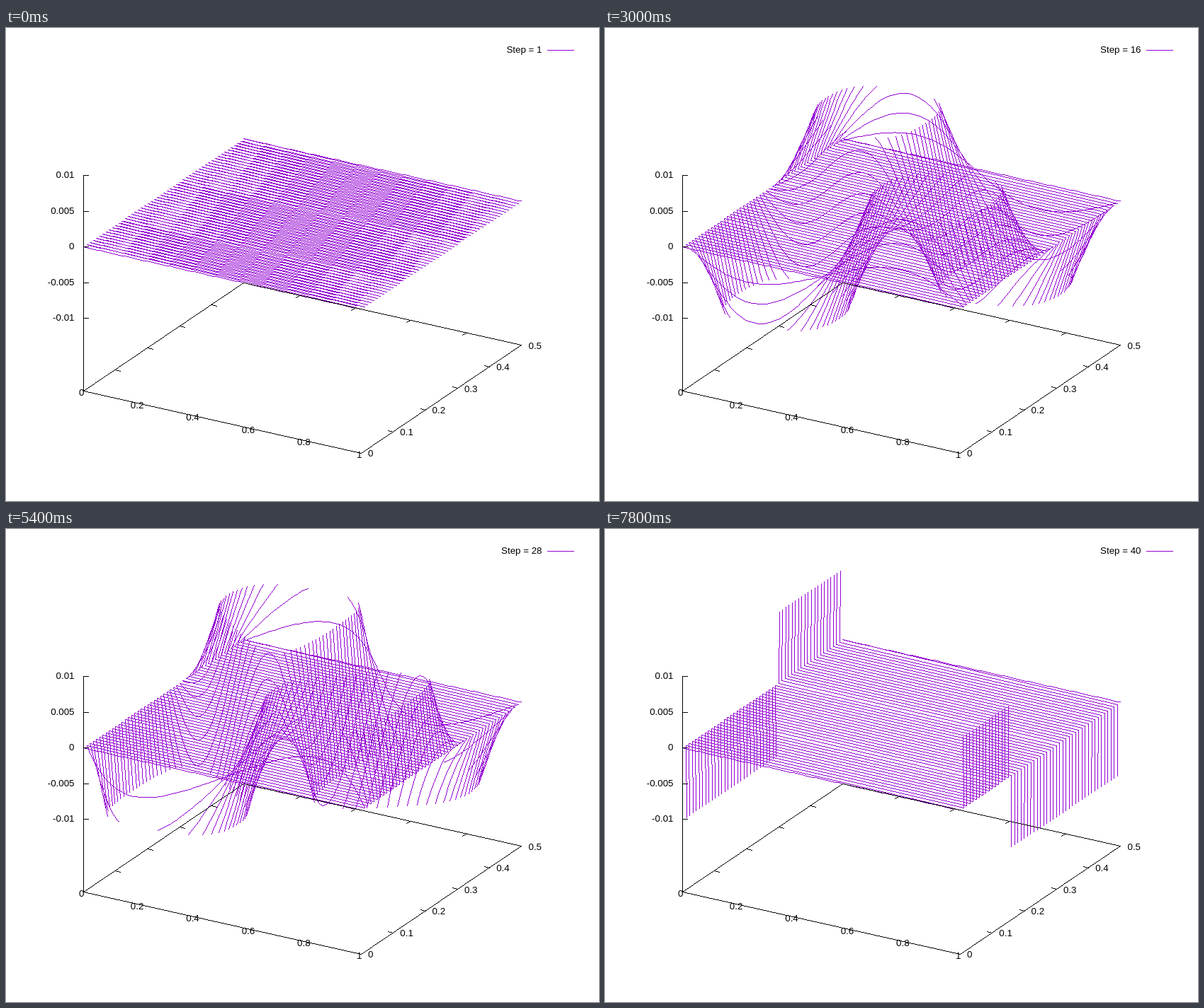
These frames come from a looping animation (837x669 px, 8000 ms). An HTML page with a canvas:

```html
<!DOCTYPE html>
<html lang="en">
<head>
<meta charset="utf-8">
<title>Surface steps</title>
<style>
  html, body { margin: 0; width: 100%; height: 100%; overflow: hidden; background: #fff; }
  canvas, svg { position: absolute; left: 0; top: 0; display: block; }
  text { font: 13.33px "Liberation Sans", Arial, sans-serif; fill: #000; }
  .mid { text-anchor: middle; }
  .end { text-anchor: end; }
</style>
</head>
<body>
<canvas id="plot" width="837" height="669"></canvas>
<svg id="labels" width="837" height="669"><text id="step" class="end" x="756.5" y="35"></text></svg>
<script>
const W = 837, H = 669, COLS = 100, ROWS = 50, STEPS = 40, STEP_MS = 200;
const Z_MAX = 0.01, FLOOR = -0.02015, TAU = 2 * Math.PI;
const BLACK = 0xff000000, VIOLET = 0xffd30094;

const ctx = document.getElementById('plot').getContext('2d');
const image = ctx.createImageData(W, H);
const pixels = new Uint32Array(image.data.buffer);
const svg = document.getElementById('labels');
const stepLabel = document.getElementById('step');

const project = (x, y, z) => [109 + 392 * x + 452.5 * y, 309.2 + 88 * x - 305.5 * y - 10120 * z];
const clamp = (v, lo, hi) => Math.min(hi, Math.max(lo, v));

// One pixel wide line without smoothing
function line([ax, ay], [bx, by], color) {
  let x = Math.round(ax), y = Math.round(ay);
  const ex = Math.round(bx), ey = Math.round(by);
  const dx = Math.abs(ex - x), dy = -Math.abs(ey - y);
  const sx = x < ex ? 1 : -1, sy = y < ey ? 1 : -1;
  let err = dx + dy;
  for (;;) {
    if (x >= 0 && x < W && y >= 0 && y < H) pixels[y * W + x] = color;
    if (x === ex && y === ey) return;
    const twice = 2 * err;
    if (twice >= dy) { err += dy; x += sx; }
    if (twice <= dx) { err += dx; y += sy; }
  }
}

// Line in space, cut off at the ends of the z range
function segment(a, b) {
  const dz = b[2] - a[2];
  if (Number.isNaN(dz)) return;
  let from = 0, to = 1;
  if (dz === 0) {
    if (Math.abs(a[2]) > Z_MAX) return;
  } else {
    const t1 = (-Z_MAX - a[2]) / dz, t2 = (Z_MAX - a[2]) / dz;
    from = Math.max(0, Math.min(t1, t2));
    to = Math.min(1, Math.max(t1, t2));
    if (from >= to) return;
  }
  const at = t => project(...a.map((v, k) => v + (b[k] - v) * t));
  line(at(from), at(to), VIOLET);
}

// Heights of a cellular wave whose points drift until they pile up
function buildFields() {
  const count = (COLS + 1) * (ROWS + 1);
  const startX = new Float64Array(count), startY = new Float64Array(count);
  const fields = [];
  for (let j = 0, k = 0; j <= ROWS; j++)
    for (let i = 0; i <= COLS; i++, k++) { startX[k] = i / COLS; startY[k] = j / ROWS / 2; }

  for (let n = 0; n < STEPS - 1; n++) {
    const squeeze = Math.min(0.98, (n / 37.2) ** 2), lift = 0.73 * squeeze;
    const gain = 0.00176 * n * (1 - 0.5 * squeeze ** 2 + squeeze ** 4);
    const field = new Float64Array(count);
    for (let j = 1; j < ROWS; j++) {
      for (let i = 1; i < COLS; i++) {
        const k = j * (COLS + 1) + i, x = i / COLS, y = j / ROWS / 2;
        let p = startX[k], q = startY[k];
        // Newton search for the place this point drifted from
        for (let pass = 0; pass < 14; pass++) {
          const sp = Math.sin(TAU * p), cp = Math.cos(TAU * p);
          const sq = Math.sin(TAU * q), cq = Math.cos(TAU * q);
          const f = p - squeeze / TAU * sp * cq - x, g = q + lift / TAU * cp * sq - y;
          const a = 1 - squeeze * cp * cq, b = squeeze * sp * sq;
          const c = -lift * sp * sq, d = 1 + lift * cp * cq;
          const det = a * d - b * c;
          const stepP = (d * f - b * g) / det, stepQ = (a * g - c * f) / det;
          p = clamp(p - clamp(stepP, -0.06, 0.06), 0, 1);
          q = clamp(q - clamp(stepQ, -0.06, 0.06), 0, 0.5);
          if (Math.abs(stepP) + Math.abs(stepQ) < 1e-8) break;
        }
        startX[k] = p;
        startY[k] = q;
        const boost = 1 + lift * Math.cos(TAU * p) * Math.cos(TAU * q);
        field[k] = -gain * boost * Math.sin(TAU * p) * Math.sin(2 * TAU * q);
      }
    }
    fields.push(field);
  }
  fields.push(collapsedField(count));
  return fields;
}

// After the blow-up only the outermost cells still rise from zero
function collapsedField(count) {
  const field = new Float64Array(count);
  for (let j = 1; j < ROWS; j++) {
    const row = j * (COLS + 1);
    field.fill(NaN, row + 1, row + COLS);
    field[row + 1] = j < 30 ? -0.04 : 0.04;
    field[row + COLS - 1] = j < 16 ? 0.4 : -0.4;
  }
  return field;
}

// All rows form one polyline, so each row end runs back to the next start
function drawSurface(field) {
  let last = null;
  for (let j = 0, k = 0; j <= ROWS; j++) {
    for (let i = 0; i <= COLS; i++, k++) {
      const point = [i / COLS, j / ROWS / 2, field[k]];
      if (last) segment(last, point);
      last = point;
    }
  }
}

function drawAxes() {
  const base = (x, y) => project(x, y, FLOOR);
  const corners = [base(0, 0), base(1, 0), base(1, 0.5), base(0, 0.5)];
  corners.forEach((c, k) => line(c, corners[(k + 1) % 4], BLACK));
  line(corners[0], project(0, 0, Z_MAX), BLACK);
  const tick = ([x, y], dx, dy) => line([x, y], [x + dx, y + dy], BLACK);
  for (let k = 0; k < 5; k++) {
    tick(project(0, 0, Z_MAX * (1 - k / 2)), 7, 0);
    if (k === 0) continue;
    tick(base(k / 5, 0.5), -5, 3);
    tick(base(0, k / 10), 7, 2);
    tick(base(1, k / 10), -7, -2);
  }
}

function addLabel(content, x, y, className) {
  const label = document.createElementNS('http://www.w3.org/2000/svg', 'text');
  label.textContent = content;
  label.setAttribute('x', x);
  label.setAttribute('y', Math.round(y));
  label.setAttribute('class', className);
  svg.append(label);
}

['0.01', '0.005', '0', '-0.005', '-0.01'].forEach((s, k) => addLabel(s, 96.5, 212 + 50.6 * k, 'end'));
for (let k = 0; k < 6; k++) {
  addLabel(String(k / 5), 106.7 + 78.4 * k, 520.4 + 17.5 * k, 'mid');
  addLabel(String(k / 10), 511 + 45.3 * k, 606.4 - 30.5 * k, 'start');
}

const fields = buildFields();
let shown = -1;

function frame(now) {
  const index = Math.floor(now % (STEPS * STEP_MS) / STEP_MS);
  if (index !== shown) {
    shown = index;
    pixels.fill(0xffffffff);
    drawSurface(fields[index]);
    drawAxes();
    line([764, 31], [801, 31], VIOLET);
    ctx.putImageData(image, 0, 0);
    stepLabel.textContent = 'Step = ' + (index + 1);
  }
  requestAnimationFrame(frame);
}

frame(0);
</script>
</body>
</html>
```
